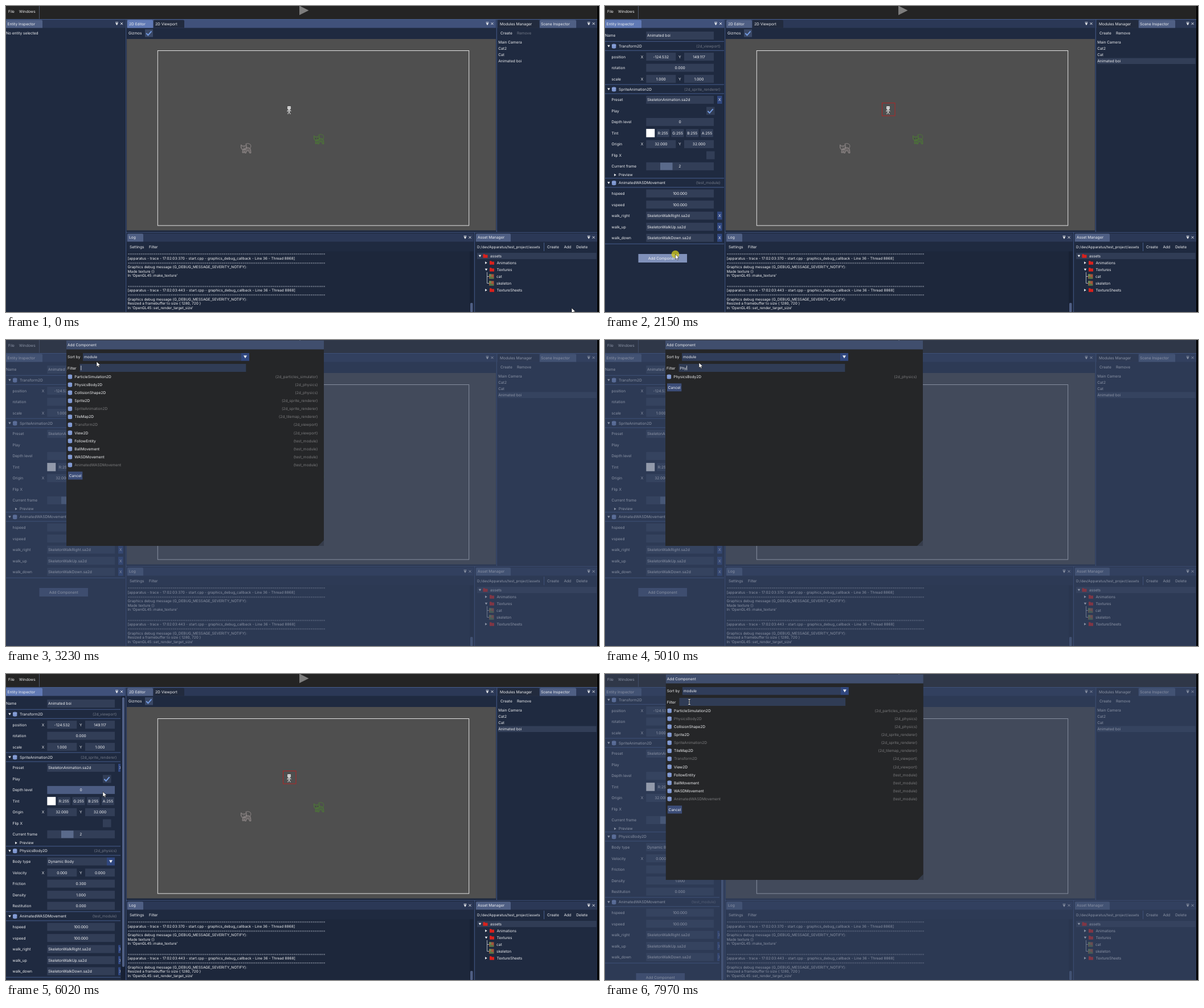
Recreate the animation shown at these times as an HTML page. Size 1041 by 538 pixels, loop 8000 ms.

```html
<!DOCTYPE html>
<html lang="en">
<head>
<meta charset="utf-8">
<title>Scene editor</title>
<style>
html, body { margin: 0; width: 100%; height: 100%; overflow: hidden; background: #000; }
svg { display: block; width: 1041px; height: 538px; }
text { font-family: Inter, "Open Sans", sans-serif; font-variant-ligatures: none; text-rendering: geometricPrecision; white-space: pre; }
.rule { letter-spacing: -.5px; }
</style>
</head>
<body>
<svg id="stage" viewBox="0 0 1041 538"></svg>
<script>
const LOOP = 8000;
const stage = document.getElementById('stage');
const C = {
  panel: '#1f2a40', line: '#465d8d', field: '#323e57', hover: '#4c5c82', text: '#f0f1f3',
  dim: '#747b89', tab: '#4f5f84', tabOn: '#6079b4', bar: '#2b3856', barOn: '#40517a',
  button: '#46557a', buttonOn: '#8091ba', blue: '#30477f', check: '#739ae0'
};

// start, end, steps, x, y
const moves = [
  [70, 530, 7, 891, 93], [750, 750, 1, 888, 91.5], [1220, 1990, 11, 123.5, 436.5],
  [2240, 2770, 7, 148, 45], [3150, 3230, 2, 159, 38], [5010, 5010, 1, 165, 40],
  [5090, 5480, 6, 152, 66], [5710, 6020, 5, 170, 207], [6100, 6420, 5, 185, 316],
  [6810, 7200, 6, 117, 529], [7520, 7900, 6, 148, 49]
];
const clicks = [[910, 1070], [2070, 2240], [3080, 3150], [5630, 5710], [7350, 7520]];
const components = [
  ['ParticleSimulation2D', '2d_particles_simulator'], ['PhysicsBody2D', '2d_physics'],
  ['CollisionShape2D', '2d_physics'], ['Sprite2D', '2d_sprite_renderer'],
  ['SpriteAnimation2D', '2d_sprite_renderer'], ['TileMap2D', '2d_tilemap_renderer'],
  ['Transform2D', '2d_viewport'], ['View2D', '2d_viewport'], ['FollowEntity', 'test_module'],
  ['BallMovement', 'test_module'], ['WASDMovement', 'test_module'],
  ['AnimatedWASDMovement', 'test_module']
];

// Drawing helpers
const rect = (x, y, w, h, fill, extra = '') =>
  `<rect x="${x}" y="${y}" width="${w}" height="${h}" fill="${fill}" ${extra}/>`;
const path = (d, fill, extra = '') => `<path d="${d}" fill="${fill}" ${extra}/>`;
const stroke = (d, color, w = 1) => path(d, 'none', `stroke="${color}" stroke-width="${w}"`);
const text = (x, cy, s, fill = C.text, anchor = 'start', size = 6.6, extra = '') =>
  `<text x="${x}" y="${cy + 2.4}" font-size="${size}" fill="${fill}" text-anchor="${anchor}" ${extra}>${s}</text>`;
const mid = (x, cy, s, fill) => text(x, cy, s, fill, 'middle');
const down = (x, y, r = 2.3, c = C.text) => path(`M${x - r} ${y - r * .8}h${2 * r}l${-r} ${r * 1.7}z`, c);
const right = (x, y, c = C.text) => path(`M${x - 1.4} ${y - 2.2}v4.4l3.6 -2.2z`, c);
const cross = (x, y) => stroke(`M${x - 2} ${y - 2}l4 4m0 -4l-4 4`, C.text, .9);
const tick = (x, y) => stroke(`M${x - 4.6} ${y + .3}l3.2 3.4l6 -7`, C.check, 2);
const cylinder = (x, y) =>
  path(`M${x - 3.7} ${y - 2.3}a3.7 1.7 0 0 1 7.4 0v4.8a3.7 1.7 0 0 1 -7.4 0z`, '#7d96d0') +
  stroke(`M${x - 3.4} ${y - 2}a3.4 1.4 0 0 0 6.8 0`, '#a9bbe6', .6);
const inside = (p, x, y, w, h) => p.x >= x && p.x <= x + w && p.y >= y && p.y <= y + h;

function cursorAt(t) {
  let p = { x: 993, y: 531 };
  for (const [a, b, n, x, y] of moves) {
    if (t < a) break;
    const i = b > a ? Math.min(n, Math.floor((t - a) / (b - a) * (n - 1) + 1e-6) + 1) : n;
    const k = (1 - Math.cos(Math.PI * i / n)) / 2;
    p = { x: p.x + (x - p.x) * k, y: p.y + (y - p.y) * k };
  }
  return p;
}

function stateAt(t) {
  const modal = (t >= 2240 && t < 5710) || t >= 7520;
  const since = t >= 7520 ? t - 7520 : t - 2240;
  const fade = modal ? Math.min(1, since / 170 + .2) : t >= 5710 ? Math.max(0, 1 - (t - 5710) / 110) : 0;
  return {
    t, modal, fade, pos: cursorAt(t),
    focus: t < 910 ? 'editor' : t < 2070 ? 'scene' : modal ? '' : 'inspector',
    selected: t >= 1070,
    body: t >= 5710,
    scroll: t < 6510 ? 0 : t < 6580 ? 12.5 : 25,
    filter: t >= 7520 ? '' : 'Phy'.slice(0, (t >= 3980) + (t >= 4290) + (t >= 4370)),
    caret: t >= 3080 && t < 5710,
    press: clicks.some(([a, b]) => t >= a && t < b)
  };
}

// tabs: [x, width, text x, label]
function titleBar(x, y, w, on, tabs, active) {
  let s = rect(x, y, w, 14.5, on ? C.barOn : C.bar);
  tabs.forEach(([tx, tw, lx, label], i) => {
    const fill = i === active ? (on ? C.tabOn : C.tab) : '#222b3e';
    s += path(`M${tx} ${y + 14.5}v-12q0 -2 2 -2h${tw - 4}q2 0 2 2v12z`, fill) + text(lx, y + 7.2, label);
  });
  const e = x + w;
  return s + stroke(`M${e - 17.5} ${y + 4.6}h5`, C.text, .9) + down(e - 15, y + 7.8, 2.4) + cross(e - 6.5, y + 7);
}

function cat(x, y, c) {
  const ink = `stroke="${c}" stroke-width=".9" stroke-linejoin="round"`;
  return `<g transform="translate(${x} ${y})">` +
    path('M7 1q3.5 -5 .5 -8q-3.5 -2.5 -8 -.5', 'none', ink) +
    path('M-1 -1h6q3 .5 3.5 3.5l.5 6h-2.5l-1.5 -4l-4 .5l-.5 3.5h-2.5l-.5 -3l-1 2.5h-2.5l.5 -4.5z', c, `fill-opacity=".4" ${ink}`) +
    path('M-8.5 -6l3 2h3.5l3 -2.5l.5 5.5l-2 3.5h-6l-2 -3z', c, `fill-opacity=".3" ${ink}`) +
    path('M-6.2 -1.8h1.6v1.6h-1.6zM-2.2 -1.8h1.6v1.6h-1.6z', '#3d3d3d') + '</g>';
}

function skeleton(x, y) {
  return `<g transform="translate(${x} ${y})">` +
    path('M-2.8 -6.5h5.6v4l-1 1.2h-3.6l-1 -1.2z', '#fff') +
    path('M-1.7 -4.6h1.2v1.3h-1.2zM.6 -4.6h1.2v1.3h-1.2z', '#222') +
    stroke('M0 -1v4M-1.8 .2h3.6M-1.6 1.8h3.2M-2.6 0l-.4 3.2M2.4 0l.6 2.4M-.2 3l-1.5 3.6h-1M.3 3l1.4 3.6h1', '#eee', .9) + '</g>';
}

function editor(s) {
  const { focus, selected } = s;
  return rect(212, 24, 649, 372, C.panel) +
    titleBar(212, 24, 648, focus === 'editor', [[213, 45, 216, '2D Editor'], [259, 54, 262, '2D Viewport']], 0) +
    text(215, 47.7, 'Gizmos') + rect(244, 41, 14, 13.5, '#3a4866') + tick(250.8, 47.6) +
    rect(212, 58, 648, 336.5, '#4f4f4f') +
    rect(266.3, 78.5, 546.4, 307.5, 'none', 'stroke="#e4e4e4"') +
    cat(421, 250, '#958d8d') + cat(549, 234, '#4c7a34') + skeleton(497, 183) +
    (selected ? rect(486.5, 170.5, 22.5, 22.5, 'none', 'stroke="#b82222" stroke-width=".9"') : '');
}

function scene(s) {
  const picked = s.t >= 910;
  return rect(862, 24, 176, 372, C.panel) +
    titleBar(862, 24, 176, s.focus === 'scene',
      [[863, 73, 867, 'Modules Manager'], [937, 64, 939, 'Scene Inspector']], 1) +
    text(868, 47.7, 'Create') + text(897, 47.7, 'Remove', s.selected ? C.text : C.dim) +
    (picked ? rect(864, 91.5, 172.5, 10.5, s.t < 1220 ? C.hover : '#323e57') : '') +
    ['Main Camera', 'Cat2', 'Cat', 'Animated boi'].map((n, i) => text(864.3, 64 + i * 10.9, n)).join('');
}

function log() {
  const rule = '='.repeat(93);
  const entry = (time, a, b, c) => [rule, `[apparatus - trace - 17:02:03:${time} - start.cpp - graphics_debug_callback - Line 36 - Thread 8868]`, rule, a, b, c];
  const note = 'Graphics debug message (G_DEBUG_MESSAGE_SEVERITY_NOTIFY):';
  const line = (y, l) => l === rule
    ? text(213.6, y, l, '#a4abba', 'start', 6.4, 'class="rule"')
    : text(213.6, y, l, C.text, 'start', 6.4);
  const put = (y, lines) => lines.map((l, i) => line(y + i * 7.6, l)).join('');
  return rect(212, 399.5, 610, 138.5, C.panel) +
    titleBar(212, 399.8, 609, false, [[213, 28, 216, 'Log']], 0) +
    text(217, 423.5, 'Settings') + text(251, 423.5, 'Filter') +
    rect(212, 431.5, 609, 106.5, '#1d273b') +
    put(436, entry('370', note, 'Made texture {}', "In 'OpenGL45::make_texture'")) +
    put(492.3, entry('443', note, 'Resized a framebuffer to size { 1280, 720 }', "In 'OpenGL45::set_render_target_size'")) +
    rect(814, 431.5, 6.5, 106.5, '#182134') + rect(815, 522, 4.5, 16, C.tab, 'rx="1.5"');
}

function assets() {
  const folder = (x, y) => path(`M${x - 4} ${y - 3.2}h3l1 1.2h4v5.2h-8z`, '#d9211c');
  const image = (x, y) => rect(x - 4, y - 4, 8.5, 8, '#a4563c') + rect(x - 4, y - 4, 4, 4, '#6f8a52') +
    path(`M${x - 4} ${y + 4}l3 -4l2 2l1.5 -1.5l2 3.5z`, '#4d7c48');
  return rect(824, 399.5, 214, 138.5, C.panel) +
    titleBar(824, 399.8, 214, false, [[825, 61, 828, 'Asset Manager']], 0) +
    text(827, 423.5, 'D:/dev/Apparatus/test_project/assets', C.text, 'start', 6.3) +
    stroke('M944.5 416v15', C.line) + text(950, 423.5, 'Create') + text(979.5, 423.5, 'Add') + text(1001, 423.5, 'Delete') +
    rect(827, 434, 209.5, 11, '#303c55') + down(832, 439.5) + folder(841.5, 439.5) + text(850, 439.7, 'assets') +
    right(842.5, 451.5) + folder(853, 451.5) + text(861.5, 451.7, 'Animations') +
    down(843, 463.5) + folder(853, 463.5) + text(861.5, 463.7, 'Textures') +
    stroke('M844.5 468v19.5h3.5M844.5 475.5h3.5', '#d0d3da', .8) +
    image(852, 475.5) + text(861, 475.7, 'cat') + image(852, 487.5) + text(861, 487.7, 'skeleton') +
    right(842.5, 499.5) + folder(853, 499.5) + text(861.5, 499.7, 'TextureSheets');
}

function inspector(s) {
  const { body, scroll } = s;
  const w = body ? 201 : 209;
  const pos = { x: s.pos.x, y: s.pos.y + scroll };
  const lit = (x, y, bw, bh, on, off) => !s.modal && inside(pos, x, y, bw, bh) ? on : off;
  let out = '', y = 0;

  const box = (x, bw) => rect(x, y - 7, bw, 14, lit(x, y - 7, bw, 14, C.hover, C.field));
  const value = (x, bw, v) => box(x, bw) + mid(x + bw / 2, y, v);
  const number = v => value(72.3, 118.7, v);
  const pair = (a, b) => mid(65, y, 'X') + value(72.3, 52, a) + mid(131.3, y, 'Y') + value(139, 52, b);
  const asset = v => box(72.3, 118.7) + text(74, y, v) + rect(197, y - 7, 8.5, 14, C.blue) + mid(201.2, y, 'X');
  const toggle = on => box(w - 31, 14.5) + (on ? tick(w - 24, y) : '');
  const tint = () => rect(72.3, y - 7.3, 15, 14.6, '#fff') +
    ['R', 'G', 'B', 'A'].map((c, i) => value(90.8 + i * 25.7, 22, c + ':255')).join('');
  const slider = () => box(72.3, 118.7) + rect(97, y - 6.5, 21.5, 13, '#5a6a8b') + mid(131.3, y, '2');
  const combo = v => box(72.3, 105) + text(74, y, v) + rect(177, y - 7, 14, 14, C.blue) + down(184, y, 3);
  const rule = cy => stroke(`M0 ${cy}H${w}`, C.line);

  const section = (name, module, rows) => {
    out += rule(y - 8.2) + down(6.5, y) + cylinder(15.7, y) + text(24, y, name) +
      text(w - 6.5, y, `(${module})`, C.dim, 'end') + rule(y + 7.8);
    y += 18.6;
    for (const [label, draw] of rows) {
      out += text(11.5, y, label) + draw();
      y += 19.5;
    }
    y -= 1.3;
  };

  y = 52;
  out += text(0, y, 'Name') + box(72.3, 118.7) + text(74, y, 'Animated boi');
  y = 70.5;
  section('Transform2D', '2d_viewport', [
    ['position', () => pair('-124.532', '149.117')], ['rotation', () => number('0.000')],
    ['scale', () => pair('1.000', '1.000')]
  ]);
  y = 146.3;
  section('SpriteAnimation2D', '2d_sprite_renderer', [
    ['Preset', () => asset('SkeletonAnimation.sa2d')], ['Play', () => toggle(true)],
    ['Depth level', () => number('0')], ['Tint', tint], ['Origin', () => pair('32.000', '32.000')],
    ['Flip X', () => toggle(false)], ['Current frame', slider]
  ]);
  out += right(17.5, 297) + text(24, 297, 'Preview');
  y = 311;
  if (body) {
    section('PhysicsBody2D', '2d_physics', [
      ['Body type', () => combo('Dynamic Body')], ['Velocity', () => pair('0.000', '0.000')],
      ['Friction', () => number('0.300')], ['Density', () => number('1.000')],
      ['Restitution', () => number('0.000')]
    ]);
    y = 426;
  }
  section('AnimatedWASDMovement', 'test_module', [
    ['hspeed', () => number('100.000')], ['vspeed', () => number('100.000')],
    ['walk_right', () => asset('SkeletonWalkRight.sa2d')], ['walk_up', () => asset('SkeletonWalkUp.sa2d')],
    ['walk_down', () => asset('SkeletonWalkDown.sa2d')]
  ]);
  out += rule(y - 7.6);
  y += 17.7;
  const bx = w / 2 - 46, by = y - 7.5;
  out += rect(bx, by, 85.5, 15, lit(bx, by, 85.5, 15, C.buttonOn, C.button)) +
    mid(bx + 42.7, y, 'Add Component');

  return `<clipPath id="pane"><rect y="39" width="${w}" height="499"/></clipPath>` +
    `<g clip-path="url(#pane)"><g transform="translate(0 ${-scroll})">${out}</g></g>` +
    (body ? rect(202, 39, 7.5, 499, '#182134') + rect(203.8, 41 + scroll * .92, 4.4, 474, C.tab, 'rx="2"') : '');
}

function dialog(s) {
  const used = ['SpriteAnimation2D', 'Transform2D', 'AnimatedWASDMovement'];
  if (s.body) used.push('PhysicsBody2D');
  const x = 106, gray = '#7b7b7d';
  const shown = components.filter(([n]) => n.toLowerCase().includes(s.filter.toLowerCase()));
  let out = rect(x, 1, 452, 361, '#252628') + rect(x, 1, 452, 15.5, '#404e6d') + text(108, 9, 'Add Component') +
    text(108, 30, 'Sort by') + rect(135, 23, 279, 13.7, '#303d5a') + text(137, 30, 'module') +
    rect(413, 23, 14, 13.7, C.blue) + down(420, 29.6, 3) +
    text(108, 49.2, 'Filter') + rect(129.6, 42, 291.7, 14, '#303c55') + text(131.3, 49.2, s.filter);
  if (s.caret) {
    const cx = 131.8 + [0, 4.3, 8.2, 11.8][s.filter.length];
    out += stroke(`M${cx} 45v8.2`, C.text, .8);
  }
  shown.forEach(([name, module], i) => {
    const y = 64.4 + i * 14.1, off = used.includes(name);
    if (!off && inside(s.pos, 118, y - 5.5, 439, 11)) out += rect(118, y - 5.5, 439, 11, C.hover);
    out += cylinder(112.4, y) + text(120.2, y, name, off ? gray : C.text) + text(547.3, y, `(${module})`, gray, 'end');
  });
  const cy = 69.2 + shown.length * 14.1;
  out += rect(109, cy - 7, 25.3, 14, '#3c4d78') + mid(121.6, cy, 'Cancel') + path('M558 352v10h-10z', '#353c4b');
  return `<g transform="translate(${s.body ? .8 : 0} 0)">${out}</g>`;
}

function pointer(s) {
  const { x, y } = s.pos;
  const ring = s.press ? `<circle cx="${x}" cy="${y}" r="6.8" fill="#d5cc1c" fill-opacity=".75"/>` : '';
  if (s.modal && inside(s.pos, 130, 42, 291, 14)) {
    const beam = `M${x - 1.8} ${y - 4.5}h3.6M${x} ${y - 4.5}v9M${x - 1.8} ${y + 4.5}h3.6`;
    return ring + stroke(beam, '#111', 1.8) + stroke(beam, '#fff', .9);
  }
  return ring + path(`M${x} ${y}v9l2.1 -1.9l1.5 3l1.5 -.7l-1.4 -2.9l2.9 -.3z`, '#fff', 'stroke="#111" stroke-width=".6"');
}

function draw(t) {
  const s = stateAt(t);
  return rect(0, 0, 1038, 538, '#1a2335') + rect(0, 0, 1038, 23, '#242424') +
    text(4, 9.2, 'File') + text(23, 9.2, 'Windows') + stroke('M58.5 0v22.5', '#4c5668') +
    path('M515 -.5v16.5l16.5 -8.2z', '#7d7d7d') +
    rect(0, 24, 209.5, 514, C.panel) +
    titleBar(0, 24, 209.5, s.focus === 'inspector', [[0, 64, 2.5, 'Entity Inspector']], 0) +
    (s.selected ? inspector(s) : text(0, 47.7, 'No entity selected')) +
    editor(s) + scene(s) + log() + assets() +
    stroke('M0 23.5H1038M210.7 24V538M861.3 24V397M211 398H1038M822.7 398V538', C.line) +
    (s.fade ? rect(0, 0, 1038, 538, '#3a4866', `fill-opacity="${(s.fade * .55).toFixed(3)}"`) : '') +
    (s.modal ? dialog(s) : '') + pointer(s);
}

let begin = null, last = '';
function update(now) {
  if (begin === null) begin = now;
  const markup = draw((now - begin) % LOOP);
  if (markup !== last) stage.innerHTML = last = markup;
  requestAnimationFrame(update);
}
stage.innerHTML = draw(0);
requestAnimationFrame(update);
</script>
</body>
</html>
```
